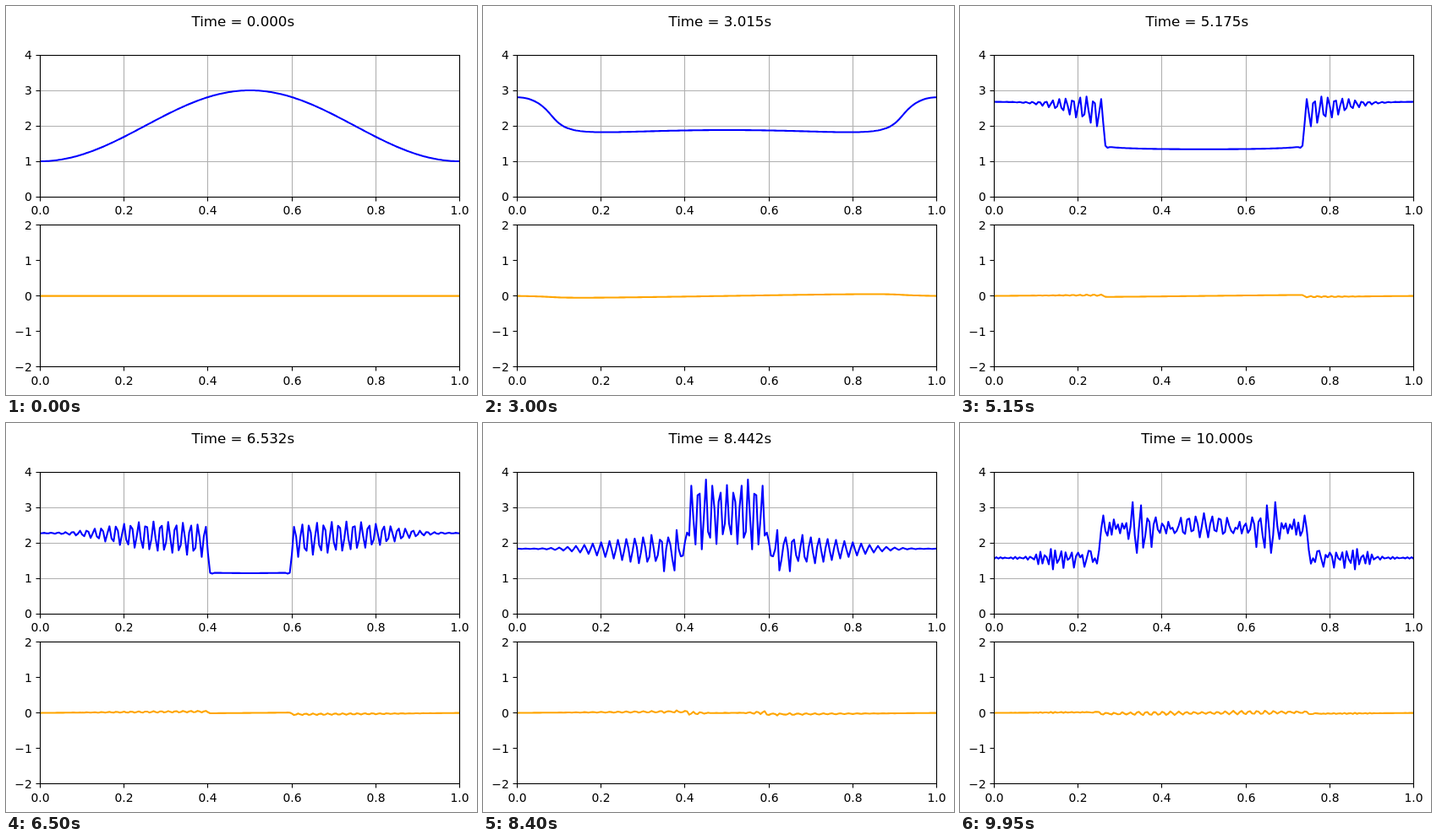
Write an HTML page with a canvas that moves like this. It is 557 px wide and 461 px high and loops after 10000 ms.

```html
<!DOCTYPE html>
<html>
<head>
<meta charset="utf-8">
<style>
  html, body { margin: 0; width: 557px; height: 461px; overflow: hidden; background: #fff; }
  canvas { display: block; }
</style>
</head>
<body>
<canvas id="stage" width="557" height="461"></canvas>
<script>
const ctx = document.getElementById('stage').getContext('2d');
const FRAMES = 200, FRAME_MS = 50, CELLS = 200, GRAVITY = 0.005, SUBSTEPS = 4;
const LEFT = 40.5, WIDTH = 496, HEIGHT = 168;

// Shallow water on a periodic line: central fourth-order slopes, Runge-Kutta in time.
const slope = f => f.map((_, i) => {
  const at = k => f[(i + k + CELLS) % CELLS];
  return (8 * (at(1) - at(-1)) - at(2) + at(-2)) * CELLS / 12;
});

function rates({ h, u }) {
  return {
    h: slope(h.map((v, i) => v * u[i])).map(v => -v),
    u: slope(h.map((v, i) => GRAVITY * v + u[i] * u[i] / 2)).map(v => -v)
  };
}

const advance = (s, r, dt) => ({
  h: s.h.map((v, i) => v + dt * r.h[i]),
  u: s.u.map((v, i) => v + dt * r.u[i])
});

function step(s, dt) {
  const a = rates(s);
  const b = rates(advance(s, a, dt / 2));
  const c = rates(advance(s, b, dt / 2));
  const d = rates(advance(s, c, dt));
  const mix = key => a[key].map((v, i) => (v + 2 * b[key][i] + 2 * c[key][i] + d[key][i]) / 6);
  return advance(s, { h: mix('h'), u: mix('u') }, dt);
}

function simulate() {
  let state = {
    h: Array.from({ length: CELLS }, (_, i) => 2 - Math.cos(2 * Math.PI * i / CELLS)),
    u: new Array(CELLS).fill(0)
  };
  const states = [state];
  const dt = 10 / (FRAMES - 1) / SUBSTEPS;
  while (states.length < FRAMES) {
    for (let k = 0; k < SUBSTEPS; k++) state = step(state, dt);
    states.push(state);
  }
  return states;
}

const crisp = v => Math.floor(v) + 0.5;

function line(x1, y1, x2, y2, color) {
  ctx.strokeStyle = color;
  ctx.lineWidth = 1.1;
  ctx.beginPath();
  ctx.moveTo(x1, y1);
  ctx.lineTo(x2, y2);
  ctx.stroke();
}

function label(text, x, y, align, size) {
  ctx.font = size + 'px "DejaVu Sans", sans-serif';
  ctx.textAlign = align;
  ctx.fillStyle = '#000';
  ctx.fillText(text, x, y);
}

function plot(values, top, low, color, grid) {
  const bottom = top + HEIGHT;
  const yOf = v => bottom - (v - low) * HEIGHT / 4;
  const ticks = [];
  for (let i = 0; i <= 5; i++) ticks.push(crisp(LEFT + i * WIDTH / 5));

  if (grid) {
    for (const x of ticks) line(x, top, x, bottom, '#b0b0b0');
    for (let i = 0; i <= 4; i++) line(LEFT, crisp(yOf(low + i)), LEFT + WIDTH, crisp(yOf(low + i)), '#b0b0b0');
  }

  ctx.save();
  ctx.beginPath();
  ctx.rect(LEFT, top, WIDTH, HEIGHT);
  ctx.clip();
  ctx.beginPath();
  for (let i = 0; i <= CELLS; i++) ctx.lineTo(LEFT + i * WIDTH / CELLS, yOf(values[i % CELLS]));
  ctx.strokeStyle = color;
  ctx.lineWidth = 2.08;
  ctx.lineJoin = 'round';
  ctx.stroke();
  ctx.restore();

  ticks.forEach((x, i) => {
    line(x, crisp(bottom), x, crisp(bottom) + 5, '#000');
    label((i / 5).toFixed(1), x, bottom + 21, 'center', 13.89);
  });
  for (let i = 0; i <= 4; i++) {
    const v = low + i, y = yOf(v);
    line(LEFT - 5, crisp(y), LEFT, crisp(y), '#000');
    label(String(v).replace('-', '\u2212'), LEFT - 9.7, y + 5.2, 'right', 13.89);
  }
  ctx.strokeStyle = '#000';
  ctx.lineWidth = 1.1;
  ctx.strokeRect(LEFT, crisp(top), WIDTH, crisp(bottom) - crisp(top));
}

const states = simulate();
const start = performance.now();

function draw(now) {
  const index = Math.floor(Math.max(0, now - start) / FRAME_MS) % FRAMES;
  const millis = Math.floor(index * 10000 / (FRAMES - 1));
  ctx.fillStyle = '#fff';
  ctx.fillRect(0, 0, 557, 461);
  label('Time = ' + (millis / 1000).toFixed(3) + 's', 280.3, 23.5, 'center', 16.67);
  plot(states[index].h, 58, 0, '#00f', true);
  plot(states[index].u, 259.6, -2, '#ffa500', false);
  requestAnimationFrame(draw);
}
draw(start);
</script>
</body>
</html>
```
